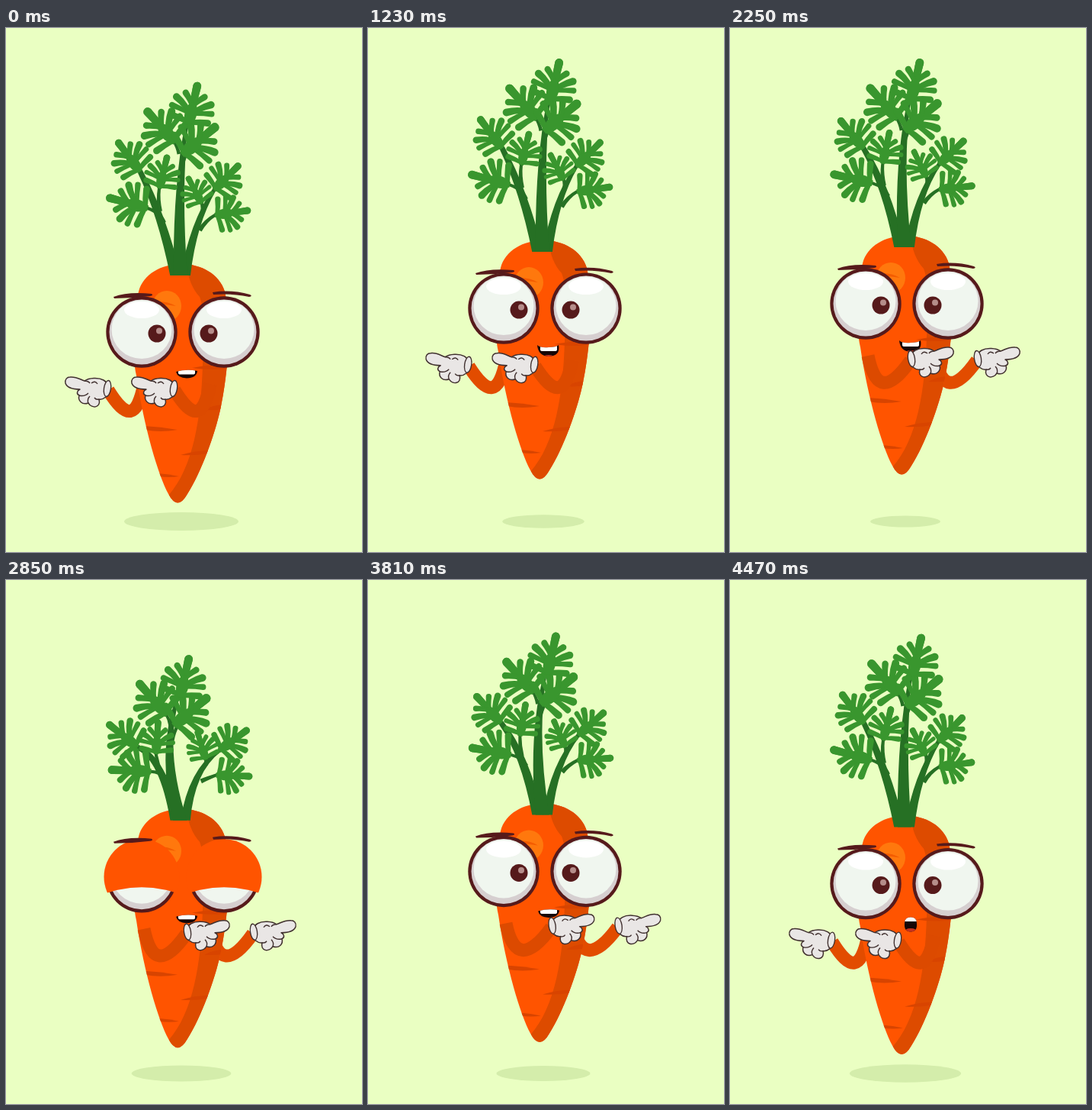
These frames come from a looping animation (467x686 px, 4.5 s). An HTML page with a canvas:

```html
<!DOCTYPE html>
<html lang="en">
<head>
<meta charset="utf-8">
<title>Pointing carrot</title>
<style>
html, body { margin: 0; width: 467px; height: 686px; overflow: hidden; background: #eaffc2; }
canvas { display: block; }
</style>
</head>
<body>
<canvas id="stage" width="467" height="686"></canvas>
<script>
const ctx = document.getElementById('stage').getContext('2d');
const TAU = Math.PI * 2, LOOP = 4500, STEP = 30, MIRROR = 449;
const ORANGE = '#ff5400', SHADE = '#dd4b00', CRACK = '#d84400', MAROON = '#561a1b';
const LEAF = '#39962e', STEM = '#267024';

const wave = (t, period) => (1 - Math.cos(TAU * t / period)) / 2;
const triangle = p => 1 - Math.abs(1 - 2 * (p % 1));
const ramp = (t, a, b) => Math.min(1, Math.max(0, (t - a) / (b - a)));

// base x, y, length, angle; then shift and turn when fully drooped
const leaves = [
  [186, 236, 57, -75, 5, 28, -15],
  [176, 188, 52, -37, -4, 47, -17],
  [201, 210, 46, 14, -5, 32, -12],
  [274, 245, 48, 82, 2, 23, 12],
  [273, 212, 49, 45, 8, 24, 10],
  [257, 230, 41, -28, 6, 17, 13],
  [222, 150, 60, -42, -12, 42, 0],
  [231, 166, 62, 50, -13, 40, 0],
  [239, 127, 58, 13, -13, 43, 0]
];

// start, control, end of each lobe in units of the leaf length
const lobes = [
  [0, 0, 0, -.5, 0, -.9, .17],
  [0, -.42, .06, -.55, .22, -.7, .13],
  [0, -.2, .12, -.42, .4, -.56, .15],
  [.1, -.28, .26, -.33, .46, -.36, .12],
  [0, -.06, .2, -.12, .42, -.14, .14]
];

function fill(path, color) {
  ctx.fillStyle = color;
  ctx.fill(new Path2D(path));
}

function stroke(path, color, width) {
  ctx.strokeStyle = color;
  ctx.lineWidth = width;
  ctx.stroke(new Path2D(path));
}

function oval(x, y, rx, ry, color, angle = 0) {
  ctx.beginPath();
  ctx.ellipse(x, y, rx, ry, angle, 0, TAU);
  ctx.fillStyle = color;
  ctx.fill();
}

function clipped(path, draw) {
  ctx.save();
  ctx.clip(new Path2D(path));
  draw();
  ctx.restore();
}

// Curved band whose width changes from w0 to w1
function taper(x0, y0, cx, cy, x1, y1, w0, w1, color) {
  const a = Math.atan2(cy - y0, cx - x0), b = Math.atan2(y1 - cy, x1 - cx);
  const sx = Math.sin(a) * w0 / 2, sy = -Math.cos(a) * w0 / 2;
  const ex = Math.sin(b) * w1 / 2, ey = -Math.cos(b) * w1 / 2;
  const mx = (sx + ex) / 2, my = (sy + ey) / 2;
  ctx.beginPath();
  ctx.moveTo(x0 + sx, y0 + sy);
  ctx.quadraticCurveTo(cx + mx, cy + my, x1 + ex, y1 + ey);
  ctx.arc(x1, y1, w1 / 2, b - Math.PI / 2, b + Math.PI / 2);
  ctx.quadraticCurveTo(cx - mx, cy - my, x0 - sx, y0 - sy);
  ctx.fillStyle = color;
  ctx.fill();
}

function drawLeaf([x, y, size, angle, dx, dy, turn], k) {
  ctx.save();
  ctx.translate(x + dx * k, y + dy * k);
  ctx.rotate((angle + turn * k) * Math.PI / 180);
  ctx.scale(size, size);
  for (const side of [1, -1]) {
    ctx.save();
    ctx.scale(side, 1);
    for (const [x0, y0, cx, cy, x1, y1, w] of lobes) taper(x0, y0, cx, cy, x1, y1, w * .75, w * 1.1, LEAF);
    ctx.restore();
  }
  oval(0, -.27, .14, .25, LEAF);
  ctx.restore();
}

function drawGreens(k) {
  const at = (x, y, dx, dy) => [x + dx * k, y + dy * k];
  const stem = (from, mid, to, w0, w1) => taper(...from, ...mid, ...to, w0, w1, STEM);
  const base = 327;
  ctx.save();
  ctx.beginPath();
  ctx.rect(0, -40, 467, 364);
  ctx.clip();
  stem([223, base], at(205, 245, 2, -3), at(176, 188, -4, 47), 14, 7);
  stem([235, base], at(245, 256, -3, 4), at(273, 212, 8, 24), 13, 5);
  stem(at(207, 255, 1, 14), at(203, 242, 0, 22), at(186, 236, 5, 28), 6, 4);
  stem(at(202, 240, -1, 22), at(199, 225, 0, 28), at(201, 210, -5, 32), 6, 4);
  stem(at(254, 265, 2, 9), at(262, 252, 2, 20), at(274, 245, 2, 23), 6, 4);
  stem(at(258, 240, 5, 14), at(258, 236, 5, 15), at(257, 230, 6, 17), 5, 4);
  stem(at(227, 165, -13, 41), at(225, 156, -13, 41), at(219, 147, -12, 42), 5, 3);
  stem(at(230, 187, -14, 38), at(231, 176, -13, 39), at(238, 162, -13, 40), 5, 4);
  stem([229, base], at(224, 210, -26, 26), at(237, 125, -13, 43), 18, 4);
  ctx.restore();
  for (const leaf of leaves) drawLeaf(leaf, k);
}

const BODY = 'M230 309C204 309 180 322 174 345C165 380 165 425 171 455C181 523 200 586 213 610Q225 633 238 610C256 582 274 532 281 500C292 450 296 385 287 345C280 322 256 309 230 309Z';

function drawBody() {
  fill(BODY, ORANGE);
  clipped(BODY, () => {
    fill('M236 305Q239 336 254 352Q262 370 258 440C256 510 246 575 213 612L230 640L310 560V300Z', SHADE);
    oval(211, 364, 19, 20, '#ff780d');
    fill('M195 358Q212 357 223 364Q210 362 195 361Z', '#f45c00');
    for (const crack of [
      'M181 521Q203 522 225 526Q202 530 182 526Z',
      'M229 559Q248 553 268 553L266 557Q248 560 229 559Z',
      'M199 583Q214 584 227 587Q214 589 200 587Z',
      'M260 500Q270 494 285 493V499Q272 501 260 500Z',
      'M244 445Q268 440 295 440V445Q268 449 244 445Z'
    ]) fill(crack, CRACK);
  });
}

function drawArm(x, jab, color) {
  const dx = -18 * jab, dy = -4 * jab;
  stroke(`M${x + 181} 466C${x + 172} 511 ${x + 158 + dx / 2} 513 ${x + 134 + dx} ${474 + dy}`, color, 17);
}

function drawHand(x, jab) {
  ctx.save();
  ctx.translate(x + 78 - 18 * jab, 463 - 4 * jab);
  ctx.lineJoin = 'round';
  const glove = 'M6-6C14-7 19-3 25-1C31-5 43-6 50-2C57 2 59 13 53 20Q48 24 44 23C47 34 35 36 30 28C22 31 16 25 18 18C14 16 15 12 19 10C11 10 2 8 0 2C-1-3 2-6 6-6Z';
  fill(glove, '#e9e6e5');
  stroke(glove, '#40302f', 1.5);
  stroke('M18 18Q25 20 30 15M30 28Q28 23 32 19M44 23Q40 24 38 21M25-1Q30-1 32 2M34 2Q39-2 42 3', '#40302f', 1.4);
  oval(55, 9, 5.2, 11.3, '#40302f', .15);
  oval(55, 9, 3.8, 9.9, '#e9e6e5', .15);
  ctx.restore();
}

function facing(scale, draw) {
  ctx.save();
  ctx.translate(MIRROR / 2, 0);
  ctx.scale(scale, 1);
  ctx.translate(-MIRROR / 2, 0);
  draw();
  ctx.restore();
}

function drawEye(x, pupilX, closed) {
  ctx.save();
  ctx.translate(x, 398);
  oval(0, 0, 46.7, 46.7, MAROON);
  oval(0, 0, 42.5, 42.5, '#d6cfd0');
  oval(0, -3.5, 39.5, 38.5, '#f0f6ef');
  oval(0, -29, 23, 11, '#fff');
  oval(pupilX, 2, 11.5, 11.5, MAROON);
  oval(pupilX + 3, -1.5, 4, 4, '#b58d8a');
  if (closed) {
    const y = -50 + 100 * closed;
    clipped(`M-60-60H60V${y + 14}Q0 ${y - 12} -60 ${y + 14}Z`, () => oval(0, 0, 49.5, 49.5, ORANGE));
  }
  ctx.restore();
}

const mouths = {
  A: ['M223 450Q237 446 251 449Q250 458 237 458.5Q225 458 223 450Z', 453.5, 470],
  B: ['M222 446Q226 450 237 449Q247 449 250 446Q253 460 237 461Q223 460 222 446Z', 454, 459],
  O: ['M229 450Q229 442 237 442Q245 442 245 450Q246 461 237 461Q228 461 229 450Z', 447.5, 456.5]
};
const speech = 'ABOBOABOBAOBAOABOABAOBAOBABOBO';

function drawMouth(t) {
  const [shape, teeth, tongue] = mouths[speech[Math.floor(t / 150)]];
  fill(shape, '#170606');
  clipped(shape, () => {
    fill(`M226 440H248V${teeth - 2}Q248 ${teeth} 245 ${teeth}H229Q226 ${teeth} 226 ${teeth - 2}Z`, '#fff');
    oval(237, tongue + 5, 9, 5, '#c6331f');
  });
}

function draw(t) {
  const lift = wave(t, 900), shrink = triangle(t / 900);
  const droop = t < 3600 ? wave(t, 1200) : .75 * wave(t, 900);
  const turn = 1 - 2 * ramp(t, 1710, 1860) + 2 * ramp(t, 4245, 4395);
  const jab = t < 4320 ? triangle(t / 600) : 0;
  const closed = Math.max(0, 1 - Math.abs(t - 2895) / 120);

  ctx.fillStyle = '#eaffc2';
  ctx.fillRect(0, 0, 467, 686);
  oval(230, 646, 75 - 29 * shrink, 12 - 4.5 * shrink, '#d4edab');

  ctx.save();
  ctx.translate(0, -37 * lift);
  facing(turn, () => drawArm(0, jab, '#e24c00'));
  drawBody();
  drawGreens(droop);
  facing(turn, () => drawArm(87, jab, '#dc4a00'));
  drawEye(178, 20, closed);
  drawEye(286, -20, closed);
  fill('M141 352Q160 345 191 348Q194 350 189 351Q165 354 142 354Z', MAROON);
  fill('M271 346Q295 342 320 349Q324 351 319 352Q296 347 272 349Z', MAROON);
  drawMouth(t);
  facing(turn, () => { drawHand(0, jab); drawHand(87, jab); });
  ctx.restore();
}

function tick() {
  draw(Math.floor(performance.now() % LOOP / STEP) * STEP);
  requestAnimationFrame(tick);
}
tick();
</script>
</body>
</html>
```
